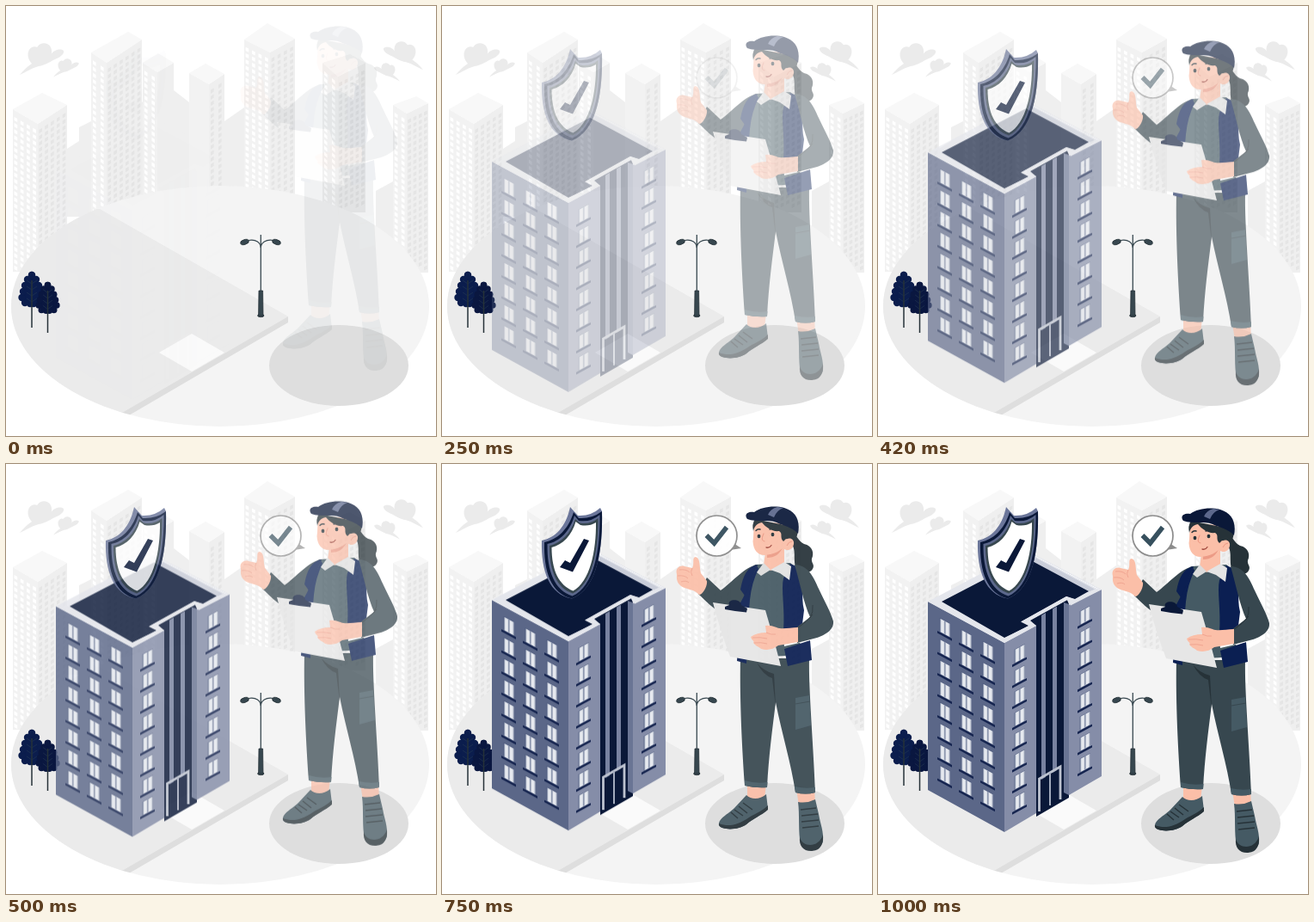
An HTML page that plays this animation: 500 by 500 pixels, repeating every 1.04 s.

```html
<!DOCTYPE html>
<html lang="en">
<head>
<meta charset="utf-8">
<title>Building check</title>
<style>
  html, body { margin: 0; width: 100%; height: 100%; overflow: hidden; background: #fff; }
  svg { display: block; width: 100%; height: 100%; }
</style>
</head>
<body>
<svg viewBox="0 0 500 500">
  <g id="city"></g>

  <g id="ground">
    <clipPath id="disc"><ellipse cx="249" cy="349" rx="243" ry="140"/></clipPath>
    <ellipse cx="249" cy="349" rx="243" ry="140" fill="#f4f4f4"/>
    <g clip-path="url(#disc)">
      <path d="M109 236L328 361L137 473L0 500V236Z" fill="#ebebeb"/>
      <path d="M328 361V368L143 476L135 473Z" fill="#dedede"/>
    </g>
    <path d="M178 403L216 381L254 403L216 425Z" fill="#fafafa"/>
    <ellipse cx="387" cy="418" rx="81" ry="47" fill="#dedede"/>
  </g>

  <g id="trees"></g>

  <g id="lamp" fill="none" stroke="#37474f">
    <path d="M296.3 266V335" stroke-width="1.3"/>
    <path d="M296.3 281C296 275 291 271 282 272.5M296.3 281C296.6 275 302 271 311 272.5" stroke-width="1.2"/>
    <g fill="#37474f" stroke="#263238" stroke-width=".8">
      <ellipse cx="277.5" cy="274.500" rx="5" ry="2.800" transform="rotate(-18 277.5 274.5)"/>
      <ellipse cx="314.5" cy="274.500" rx="5" ry="2.800" transform="rotate(18 314.5 274.5)"/>
      <ellipse cx="296.3" cy="360" rx="3.700" ry="1.700"/>
      <path d="M294 331H298.6L299 360H293.6Z"/>
    </g>
  </g>

  <g id="tower">
    <path d="M58 160L172 100L260 146L147 208Z" fill="#e4e6ec"/>
    <path d="M172 103L253 146L243 149L172 112Z" fill="#c9cdd9"/>
    <path d="M172 101.5L257 146" stroke="#fff" stroke-dasharray="1.5 1" fill="none"/>
    <path d="M74 160L172 109L245 148L229 157L219 154L167 183L176 188L147 202Z" fill="#0a1838"/>
    <path d="M58 160L147 208V428L58 379Z" fill="#5b6788"/>
    <path d="M147 208L184 188V406L147 428Z" fill="#858da8"/>
    <path d="M184 188L177 182L220 158L222 163V388L184 410Z" fill="#0a1838"/>
    <path d="M190 176L195 173V364L190 367ZM203 168.500L208 165.500V356L203 359Z" fill="#7882a0"/>
    <path d="M216 161L222 163V385L216 382Z" fill="#6a7594"/>
    <path d="M222 164L260 146V363L222 385Z" fill="#858da8"/>
    <path d="M58 160L147 208L184 188L175 182.500L220 158L224 164.500L260 146L252 145.500L229 157.500L219 154L166 183.500L175 188L147 202.500L70 160Z" fill="#e4e6ec"/>
    <path d="M187.500 404V366L212 352V390" fill="none" stroke="#bcc2cf" stroke-width="2.800"/>
    <path d="M200 359V397" stroke="#a3abbd" stroke-width="2"/>
    <g id="panes"></g>
  </g>

  <g id="shield">
    <path d="M116 89C131 86 144 74 149 50L158 60Q173 61 184 51L186 55C187 98 181 145 151 156.5C125 152 115 125 116 89Z" fill="#6b769a"/>
    <path d="M119 91C134 88 147 76 153 56L159 63Q174 64 186 55C187 98 181 145 151 156.5C127 151 118 125 119 91Z" fill="#0a1838"/>
    <path d="M122.5 93C137 90 149 78 154 60L159 66Q173 68 183.5 59C184 98 177 143 151.5 153.5C131 147 122 125 122.5 93Z" fill="#5c688c"/>
    <path d="M125 95C138 92 150 81 155 64L160 68.5Q172 71 181.5 63C182 99 175 140 152 150.5C133 144 125 124 125 95Z" fill="#37474f"/>
    <path d="M127.500 97C140 94 151 83 155.500 67L161 71Q171 73 179 68C179.500 101 172 137 152.500 147.500C136 141 127.500 124 127.500 97Z" fill="#fff"/>
    <path d="M137 120L143 112L149 115L165 87L171 89L152 125.5Z" fill="#0a1838"/>
  </g>

  <g id="worker">
    <!-- legs and shoes -->
    <g fill="#fbbfa8">
      <path d="M355 374H377L375 391L355 394Z"/>
      <path d="M412 380H433L434 397L415 399Z"/>
    </g>
    <path d="M354 387C359 392 369 393 377 386L379 403C371 411 362 414 354 421C345 428 325 428 322 422C321 414 333 409 340 402Z" fill="#455a64"/>
    <path d="M322 420C335 425 346 420 354 415C362 409 371 407 379 399V404C371 411 362 414 354 421C345 428 325 428 322 422Z" fill="#263238"/>
    <path d="M414 395Q424 397 434 392L438 409C440 421 444 429 443 441C440 452 421 454 417 443C414 432 416 409 414 395Z" fill="#455a64"/>
    <path d="M416 436C419 448 438 449 443 433C444 449 436 452 429 452C420 452 415 446 416 436Z" fill="#263238"/>
    <path d="M340 404L350 411M345 400L355 408M350 396L361 404M336 407L344 414M417 404L435 402M418 411L437 409M418 418L438 416M419 425L438 423" fill="none" stroke="#263238" stroke-width="1.5"/>
    <path d="M347 228H427C426 262 432 330 434 384Q423 387 411 384C406 350 395 315 388 279C384 312 380 340 378 378Q365 379 352 376C349 335 346 276 347 228Z" fill="#37474f"/>
    <path d="M352 370Q365 374 378.500 372L378 378Q365 379 352 376ZM410 377Q423 380 434 378V384Q423 387 411 384Z" fill="#455a64"/>
    <path d="M366 233Q374 243 386 246L388 285L384 251Q374 248 366 233Z" fill="#263238"/>
    <path d="M411 274L427 271L429 306L411 311Z" fill="#455a64"/>
    <path d="M411 281L428 278" stroke="#37474f" fill="none"/>

    <!-- ponytail -->
    <path d="M404 80C412 82 414 92 421 95C431 97 433 106 430 112C429 117 434 119 431 124C427 131 414 129 411 121C408 110 413 100 404 92Z" fill="#263238"/>

    <!-- torso -->
    <path d="M364 119L405 117L418 128L416 224L345 228Q348 190 349 160L352 132Z" fill="#455a64"/>
    <path d="M366 120Q355 124 352 134L347 160L343 231L354 234Q355 190 358 160Q360 140 368 124Z" fill="#0b1f52"/>
    <path d="M405 118L417 123C422 142 417 156 421 172L418 196H397C399 170 394 148 397 135Z" fill="#0b1f52"/>
    <path d="M398 217L428 207L430 230L402 237Z" fill="#0b1f52"/>
    <path d="M397 204L428 200V207L398 214Z" fill="#fff"/>
    <path d="M410 119C425 119 432 133 438 147C445 162 452 174 455 185C456 195 445 201 436 204L413 210L411 193L428 180C421 165 416 140 410 119Z" fill="#37474f"/>
    <path d="M413 193Q424 186 431 177M431 166Q432 174 428 181" fill="none" stroke="#263238"/>
    <path d="M367 119C352 121 337 140 324 149L308 134L298 153C306 160 318 175 332 176C346 172 351 155 358 140Z" fill="#37474f"/>
    <path d="M367 119C355 121 350 132 347 148L352 155C358 143 362 130 367 119Z" fill="#0b1f52"/>

    <!-- raised hand -->
    <path d="M291 123C294 117 290 111 295 110C301 112 299 122 301 129L308 138C309 144 303 154 299 154C293 147 283 148 278 144C272 139 273 135 273 130C271 124 276 119 282 121Z" fill="#fbbfa8"/>
    <path d="M276 125Q284 124 288 128M274 132Q282 131 286 135M278 139Q284 137 287 140M291 123Q288 128 291 132" fill="none" stroke="#f0a591"/>

    <!-- head -->
    <path d="M377 99L398 96L398 119L382 126L374 119Z" fill="#fbbfa8"/>
    <path d="M378 107Q388 106 396 99Q391 111 378 111Z" fill="#ec9b86"/>
    <path d="M365 68C361 78 363 84 361.5 92C362 102 367 108 375 108C386 107 394 103 399 97L405 72Z" fill="#fbbfa8"/>
    <path d="M364 66L413 76C415 84 412 90 406 93L400 89L397 92C392 87 397 83 392 80C384 81 377 76 372 70C366 71 363 75 362 80Q360 72 364 66Z" fill="#263238"/>
    <path d="M398 92C402 86 410 88 409 95C408 102 401 104 397 100Z" fill="#fbbfa8"/>
    <path d="M401 97Q403 92 407 92" fill="none" stroke="#ec9b86"/>
    <g fill="#263238">
      <ellipse cx="368.5" cy="86" rx="1.900" ry="2.300"/>
      <ellipse cx="384.5" cy="84" rx="1.900" ry="2.300"/>
    </g>
    <g fill="none" stroke-linecap="round">
      <path d="M365 79.500Q367 77 370 78M381 78Q385 76 388 79" stroke="#263238" stroke-width="1.400"/>
      <path d="M374 83Q370 91 375 92" stroke="#ec9b86" stroke-width="1.200"/>
      <path d="M377 99Q381 100 383 96.500" stroke="#a34b40" stroke-width="1.300"/>
    </g>

    <!-- cap -->
    <path d="M363 58C371 52 386 50 398 53C411 57 417 67 414 83C407 75 397 74 389 70C379 66 366 70 355 66C351 61 355 57 363 58Z" fill="#0a1838"/>
    <path d="M379 61Q382 54 390 52L397 53Q389 56 386 64Z" fill="#5c688c"/>

    <!-- collar -->
    <path d="M374 117L366 128L371 132L382 125Z" fill="#dcdcdc"/>
    <path d="M382 125L398 116L406 121L404 137L393 129Z" fill="#e4e4e4"/>

    <!-- clipboard -->
    <path d="M315 163L376 172Q386 205 394 237L335 226Q323 195 315 163Z" fill="#e6e6e6"/>
    <path d="M329 168L334 166C331 159 347 158 348 166L355 170L354 174.500Q340 173 329 171Z" fill="#0a1838"/>
    <path d="M414 192C404 192 396 195 389 192Q381 189 376 190L377 198Q366 198 359 203C360 208 364 207 362 210C365 214 368 214 371 217Q382 220 391 213L414 209Z" fill="#fbbfa8"/>
    <path d="M361 204Q370 203 378 205M363 210Q371 209 378 211M377 198Q383 201 388 200" fill="none" stroke="#f0a591"/>
  </g>

  <g id="bubble">
    <path d="M339 92L348 98L335 100Z" fill="#8c8c8c"/>
    <circle cx="319.5" cy="83.500" r="23.500" fill="#fff" stroke="#8c8c8c" stroke-width="1.700"/>
    <path d="M307.5 83L316.5 92L331 73.5" fill="none" stroke="#37505e" stroke-width="5.500"/>
  </g>
</svg>

<script>
const $ = id => document.getElementById(id);
const shape = (d, fill) => `<path d="${d}" fill="${fill}"/>`;

// Small slanted windows over one wall, from its top left corner.
function dots(x, y, width, slope, bottom) {
  const cols = Math.max(2, Math.floor(width / 6.2)), pitch = width / cols;
  let d = '';
  for (let c = 0; c < cols; c++) {
    const left = x + (c + .22) * pitch;
    for (let top = y + (left - x) * slope + 8; top < bottom - 6; top += 7.2)
      d += `M${left.toFixed(1)} ${top.toFixed(1)}l3.6 ${3.6 * slope}v4.2l-3.6 ${-3.6 * slope}z`;
  }
  return d;
}

// Corners of the roof: left, front, right, back.
function block([l, f, r, b], bottom, walls = 'LR') {
  const wall = (p, q, fill, pane, on) => {
    const slope = (q[1] - p[1]) / (q[0] - p[0]);
    return shape(`M${p}L${q}V${bottom}H${p[0]}Z`, fill) +
      (on ? shape(dots(p[0], p[1], q[0] - p[0], slope, bottom), pane) : '');
  };
  return wall(l, f, '#f2f2f2', '#fff', walls.includes('L')) +
    wall(f, r, '#efefef', '#e5e5e5', walls.includes('R')) +
    shape(`M${l}L${f}L${r}L${b}Z`, '#f8f8f8');
}

const cloud = (x, y, s, flip) => `<g transform="translate(${x} ${y}) scale(${flip * s} ${s})">` +
  shape('M0 37C4 32 8 28 14 24C8 18 8 8 14 5C18 3 20 6 21 4C24-1 33-1 36 5C38 9 37 13 36 14C39 8 47 6 51 9C52 12 48 16 43 18C36 21 30 26 22 27C14 29 7 34 0 37Z', '#ebebeb') + '</g>';

$('city').innerHTML =
  cloud(16, 43, 1, 1) + cloud(55, 61, .58, 1) + cloud(485, 41, .9, -1) + cloud(458, 66, .58, -1) +
  shape('M71 166L85 157V141L99 134L195 98L213 112V132L254 134L277 118V245H71Z', '#efefef') +
  shape('M430 215L450 204V290H430Z', '#efefef') +
  block([[99, 54], [117, 66], [158, 39], [142, 30]], 250) +
  block([[159, 66], [176, 77], [195, 66], [177, 55]], 235, 'L') +
  block([[213, 78], [236, 91], [254, 79], [232, 67]], 230, 'R') +
  block([[277, 39], [307, 54], [336, 38], [304, 20]], 230) +
  block([[368, 66], [386, 82], [418, 66], [400, 56]], 240) +
  block([[8, 120], [37, 137], [71, 115], [42, 101]], 309) +
  block([[450, 115], [466, 125], [491, 113], [477, 105]], 310);

// Foliage is a filled outline with a round lobe at each corner.
function tree(x, top, size, foot, fill) {
  const half = [[0, 4], [5, 9], [8, 16], [10, 23], [11.5, 30], [8, 36], [2, 37]];
  const side = s => half.map(([w, h]) => [x + s * w * size, top + h * size]);
  const edge = [...side(1), ...side(-1).reverse()];
  const lobes = edge.map(([cx, cy]) => `<circle cx="${cx}" cy="${cy}" r="${4.2 * size}"/>`).join('');
  const twigs = [14, 21, 28, 35].map(h => {
    const y = top + h * size;
    return `M${x - 6 * size} ${y - 4}L${x} ${y}L${x + 6 * size} ${y - 4}`;
  }).join('');
  return `<g fill="${fill}"><path d="M${edge.join('L')}Z"/>${lobes}</g>` +
    `<path d="${twigs}" fill="none" stroke="#263a55" stroke-width=".6"/>` +
    `<path d="M${x} ${top + 10}V${foot}" stroke="#263238" stroke-width="1.5"/>`;
}
$('trees').innerHTML = tree(30, 309, 1, 374, '#0b1d4d') + tree(48.5, 321, .9, 380, '#0a1740');

// One window; dir is 1 on the left wall, -1 on the right wall.
function pane(x, y, dir) {
  const s = .54 * dir;
  const slab = (dx, dy, w, h, fill) =>
    shape(`M${x + dx} ${y + dy + dx * s}l${w} ${w * s}v${h}l${-w} ${-w * s}z`, fill);
  return slab(-.3, -.5, 12, 16.5, '#4d5a7e') + slab(.5, 0, 11, 15.5, '#c6ccd8') +
    slab(1.5, .5, 3, 14.5, '#e6e9ef') + slab(7, .5, 3, 14.5, '#e6e9ef') +
    slab(5.2, 0, 1.2, 15, '#7f8aa6') +
    slab(-3, 16, 17, 2.6, '#15244f');
}
let panes = '';
for (let row = 0; row < 8; row++) {
  const y = row * 24.5;
  for (let col = 0; col < 3; col++) panes += pane(72 + 25 * col, 179.5 + 13.5 * col + y, 1);
  panes += pane(159, 216 + y, -1) + pane(235, 171.5 + y, -1);
}
$('panes').innerHTML = panes;

const LOOP = 1040, STEPS = 25, STEP = LOOP / STEPS;
const BACK = 'cubic-bezier(.36,-.01,.5,1.38)';
const slide = from => ({ transform: [`translateY(${from}px)`, 'translateY(0)'], opacity: [0, 1] });
const clips = [
  ['tower', slide(30), BACK],
  ['worker', slide(-30), 'ease-out'],
  ['shield', { opacity: [0, 1] }, BACK],
  ['bubble', { opacity: [0, 0, .22, .47, .82, .96, 1], offset: [0, .21, .37, .46, .62, .79, 1] }, 'linear']
].map(([id, frames, easing]) => {
  const clip = $(id).animate(frames, { duration: 1000, easing, fill: 'both' });
  clip.pause();
  return clip;
});

const start = performance.now();
function draw() {
  const t = (performance.now() - start) % LOOP;
  const step = Math.min(STEPS - 1, Math.floor((t + 5) / STEP));
  for (const clip of clips) clip.currentTime = (step + 1) * STEP;
  requestAnimationFrame(draw);
}
draw();
</script>
</body>
</html>
```
